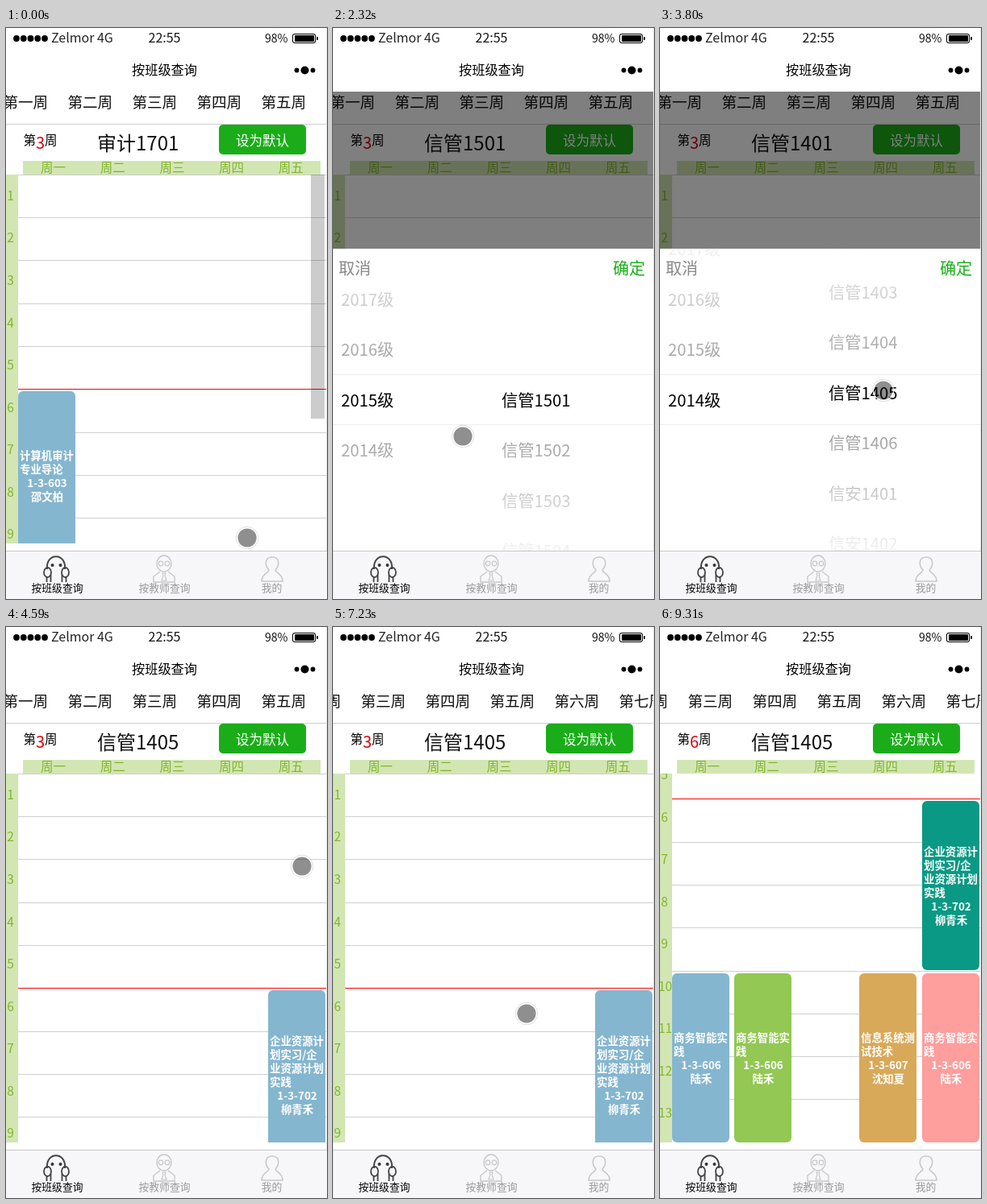
These frames come from a looping animation (398 by 709 pixels, 9860 ms). An HTML page with a canvas:

```html
<!DOCTYPE html>
<html lang="zh-CN">
<head>
<meta charset="utf-8">
<title>按班级查询</title>
<style>
html, body { margin: 0; width: 100%; height: 100%; overflow: hidden; background: #fff; }
canvas { display: block; }
</style>
</head>
<body>
<canvas id="stage" width="398" height="709"></canvas>
<script>
const c = document.getElementById('stage').getContext('2d');
const LOOP = 9860, STEP = 1000 / 13;
const TOP = 182, BOTTOM = 640, ROW = 53.3, PICK = 62.5;
const FONT = '"Noto Sans CJK SC", "Noto Sans CJK", "Noto Sans", sans-serif';
const GREEN = '#1aad19', LEAF = '#83b52b', PALE = '#d2e6b4', RULE = '#d0d0d0', ICON = '#c8c8c8';
const NUMERALS = [...'一二三四五六七八九'];

const OPEN = 830, YEAR_2015 = 2000, YEAR_2014 = 2750, CLASS_PICKED = 3950, CLOSE = 4510;
const WEEK_SIX = 8150, LESSONS_READY = 8220, POINTER_GONE = 9310;

// Each move eases the pointer to x, y; a drag also scrolls the named list with it.
const move = (from, to, x, y, drag) => ({ from, to, x, y, drag });
const moves = [
  move(60, 150, 125, 133),
  move(300, 530, 166, 145),
  move(1000, 1530, 35, 540),
  move(1540, 1850, 45, 415, 'year'),
  move(1920, 2300, 161, 507),
  move(2400, 2640, 165, 444.5, 'year'),
  move(2700, 2990, 248, 590),
  move(3000, 3280, 260, 465, 'group'),
  move(3300, 3480, 264, 584),
  move(3500, 3760, 277, 450, 'group'),
  move(4040, 4350, 367, 297),
  move(4740, 5050, 274, 83),
  move(5200, 5600, 319, 88),
  move(5750, 5900, 303, 87),
  move(5990, 6140, 181, 87, 'weeks'),
  move(6310, 6690, 215, 92),
  move(6840, 7150, 240, 480),
  move(7160, 7460, 240, 312, 'table'),
  move(7480, 7900, 305, 94),
  move(8150, 8460, 260, 375),
  move(8480, 8770, 258, 308, 'table'),
  move(9160, 9300, 282, 449)
];

function poseAt(t) {
  const pose = { x: 299, y: 633, year: 0, group: 0, weeks: 0, table: 0 };
  for (const { from, to, x, y, drag } of moves) {
    const p = Math.min(1, Math.max(0, (t - from) / (to - from)));
    const ease = p * p * (3 - 2 * p);
    const dx = (x - pose.x) * ease, dy = (y - pose.y) * ease;
    pose.x += dx;
    pose.y += dy;
    if (drag) pose[drag] -= drag === 'weeks' ? dx : dy;
  }
  return pose;
}

function text(s, x, y, size, color = '#000', align = 'left', weight = 400) {
  c.font = `${weight} ${size}px ${FONT}`;
  c.textAlign = align;
  c.fillStyle = color;
  c.fillText(s, x, y + size * 0.38);
}
function rect(x, y, w, h, color, r = 0) {
  c.fillStyle = color;
  c.beginPath();
  c.roundRect(x, y, w, h, r);
  c.fill();
}
function dot(x, y, r, color) {
  c.fillStyle = color;
  c.beginPath();
  c.arc(x, y, r, 0, 7);
  c.fill();
}
function ring(x, y, rx, ry, color, width) {
  c.strokeStyle = color;
  c.lineWidth = width;
  c.beginPath();
  c.ellipse(x, y, rx, ry, 0, 0, 7);
  c.stroke();
}
function stroke(path, color, width) {
  c.strokeStyle = color;
  c.lineWidth = width;
  c.stroke(new Path2D(path));
}
function clipped(x, y, w, h, draw) {
  c.save();
  c.beginPath();
  c.rect(x, y, w, h);
  c.clip();
  draw();
  c.restore();
}

const BLUE = '#85b6cf';
const lesson = (day, first, color, course, room, teacher) =>
  ({ day, first, color, lines: course.split('|'), room, teacher });
const planning = (color, room) =>
  lesson(4, 6, color, '企业资源计|划实习/企|业资源计划|实践', room, '柳青禾');
const business = (day, color) => lesson(day, 10, color, '商务智能实|践', '1-3-606', '陆禾');
const weekSix = [
  planning('#0a9984', '1-3-702'), business(0, BLUE), business(1, '#92c853'),
  lesson(3, 10, '#d8a958', '信息系统测|试技术', '1-3-607', '沈知夏'), business(4, '#fe9e9d')
];

function lessonsAt(t) {
  if (t < CLOSE) return [lesson(0, 6, BLUE, '计算机审计|专业导论', '1-3-603', '邵文柏')];
  if (t < WEEK_SIX) return [planning(BLUE, '1-3-702')];
  return t < LESSONS_READY ? [planning(BLUE, '1-3-606')] : weekSix;
}

const rowTop = (i, scroll) => TOP + 0.3 + i * ROW - scroll;

function drawLesson({ day, first, color, lines, room, teacher }, scroll) {
  const x = Math.floor(15 + day * 77.5), y = Math.floor(rowTop(first - 1, scroll) + 3.1);
  rect(x, y, 71, 210, color, 6);
  const firstLine = y + 105 - (lines.length + 1) * 8.5;
  [...lines, room, teacher].forEach((line, i) => {
    const centered = i >= lines.length;
    text(line, x + (centered ? 36 : 2), firstLine + i * 17, 13.4, '#fff', centered ? 'center' : 'left', 700);
  });
}

function drawTable(t, scroll) {
  clipped(0, TOP, 397, BOTTOM - TOP, () => {
    rect(0, TOP, 15, BOTTOM - TOP, PALE);
    for (let i = 0; i < 13; i++) {
      rect(15, Math.floor(rowTop(i, scroll)), 382, 1, i === 5 ? '#f00' : RULE);
      text(String(i + 1), i < 9 ? 5.5 : 6.5, 208 + i * 52.55 - scroll, 15.5, LEAF, 'center');
    }
    lessonsAt(t).forEach(l => drawLesson(l, scroll));
  });
  if (t < OPEN) rect(378, TOP, 17, 303, 'rgba(0,0,0,.2)');
}

function drawStatus() {
  for (let i = 0; i < 5; i++) dot(13 + i * 8.75, 13, 3.9, '#000');
  text('Zelmor 4G', 56, 12, 16, '#222');
  text('22:55', 196.5, 12, 16, '#111', 'center');
  text('98%', 321, 13, 14, '#111');
  rect(355, 7, 29, 12, '#000', 3);
  rect(356, 8, 27, 10, '#fff', 2);
  rect(358, 9, 24, 8, '#000', 1);
  rect(385, 11, 2, 4, '#000', 1);

  text('按班级查询', 196.5, 52, 16.2, '#000', 'center');
  for (const i of [-1, 0, 1]) dot(370.5 + i * 10, 52.5, i ? 2.9 : 5, '#000');
}

function drawHeader(t, shift) {
  clipped(0, 79, 397, 40, () => {
    NUMERALS.forEach((n, i) => text(`第${n}周`, 24.3 + i * 80 - shift, 92, 18.6, '#111', 'center'));
  });
  rect(0, 119, 397, 1, RULE);

  text('第', 21.5, 139, 15.5);
  text(t < WEEK_SIX ? '3' : '6', 42.5, 142, 20, '#d8000c', 'center');
  text('周', 48, 139, 15.5);
  const title = t < YEAR_2015 ? '审计1701' : t < YEAR_2014 ? '信管1501' : t < CLASS_PICKED ? '信管1401' : '信管1405';
  text(title, 113, 143, 24, '#111');
  rect(264, 120, 108, 37, GREEN, 5);
  text('设为默认', 318, 139.5, 16.5, '#fff', 'center');

  rect(21, 165, 369, 17, PALE);
  NUMERALS.slice(0, 5).forEach((n, i) => text('周' + n, 58.5 + i * 73.7, 173.5, 15.5, LEAF, 'center'));
}

function drawPicker(t, pose) {
  rect(0, 79, 397, 195, 'rgba(0,0,0,.5)');
  rect(0, 274, 397, 375, '#fff');
  const year = pose.year / PICK, drift = pose.group / PICK;
  const group = t < CLASS_PICKED ? drift : Math.round(drift);
  const suffix = t < YEAR_2015 ? 17 : t < YEAR_2014 ? 15 : 14;
  clipped(0, 274, 397, 375, () => {
    for (let i = 0; i < 4; i++) text(`${2017 - i}级`, 10, 462 + (i - year) * PICK, 20.3);
    for (let i = 0; i < 9; i++) {
      const name = (i < 6 ? '信管' : '信安') + suffix + '0' + (i % 6 + 1);
      text(name, 209, 462 + (i - group) * PICK, 20.3);
    }
    for (const [top, far, near] of [[274, 274, 430], [493, 649, 493]]) {
      const fade = c.createLinearGradient(0, far, 0, near);
      fade.addColorStop(0, 'rgba(255,255,255,.95)');
      fade.addColorStop(1, 'rgba(255,255,255,.6)');
      rect(0, top, 397, 156, fade);
    }
  });
  rect(0, 430, 397, 1, '#eee');
  rect(0, 492, 397, 1, '#eee');
  text('取消', 7, 298, 20, '#888');
  text('确定', 347, 298, 20, GREEN);
}

function drawTabs() {
  rect(0, 649, 398, 60, '#f7f7fa');
  rect(0, 649, 398, 1, ICON);

  // Face between two raised hands
  stroke('M51 672C49 651 75 651 73 672', '#444', 2);
  for (const side of [-1, 1]) {
    ring(62.5 + side * 11, 676, 4.5, 6, '#444', 1.8);
    dot(62.5 + side * 5, 667, 2, '#333');
    stroke(`M${62.5 + side * 7} 679V688M${62.5 + side * 12} 682V688`, '#444', 1.8);
  }

  // Teacher with glasses and tie
  ring(196, 665, 9, 10, ICON, 1.4);
  for (const side of [-1, 1]) {
    ring(196 + side * 4, 665, 2.8, 2.8, ICON, 1.2);
    stroke(`M${196 + side * 5} 675L${196 + side * 13} 681V688H196`, ICON, 1.4);
  }
  stroke('M194 677h4l-1 3l2 6h-6l2-6z', ICON, 1.2);

  // User
  stroke('M330 657C320 657 321 668 326 673C326 677 317 677 317 687H343C343 677 334 677 334 673C339 668 340 657 330 657Z', ICON, 1.6);

  text('按班级查询', 63.5, 695, 12.8, '#000', 'center');
  text('按教师查询', 196.5, 695, 12.8, '#999', 'center');
  text('我的', 329.5, 695, 12.8, '#999', 'center');
}

function drawPointer({ x, y }) {
  dot(x, y, 11.6, 'rgba(0,0,0,.44)');
  ring(x, y, 12.6, 12.6, 'rgba(255,255,255,.8)', 1.2);
  ring(x, y, 13.8, 13.8, 'rgba(0,0,0,.13)', 1);
}

function render(elapsed) {
  const t = elapsed % LOOP;
  const pose = poseAt(Math.floor(t / STEP) * STEP);
  rect(0, 0, 398, 709, '#fff');
  drawStatus();
  drawHeader(t, pose.weeks);
  drawTable(t, pose.table);
  if (t >= OPEN && t < CLOSE) drawPicker(t, pose);
  rect(397, 0, 1, 649, '#e9e9e9');
  drawTabs();
  if (t < POINTER_GONE) drawPointer(pose);
}

let start;
function frame(now) {
  start ??= now;
  render(now - start);
  requestAnimationFrame(frame);
}
requestAnimationFrame(frame);
</script>
</body>
</html>
```
